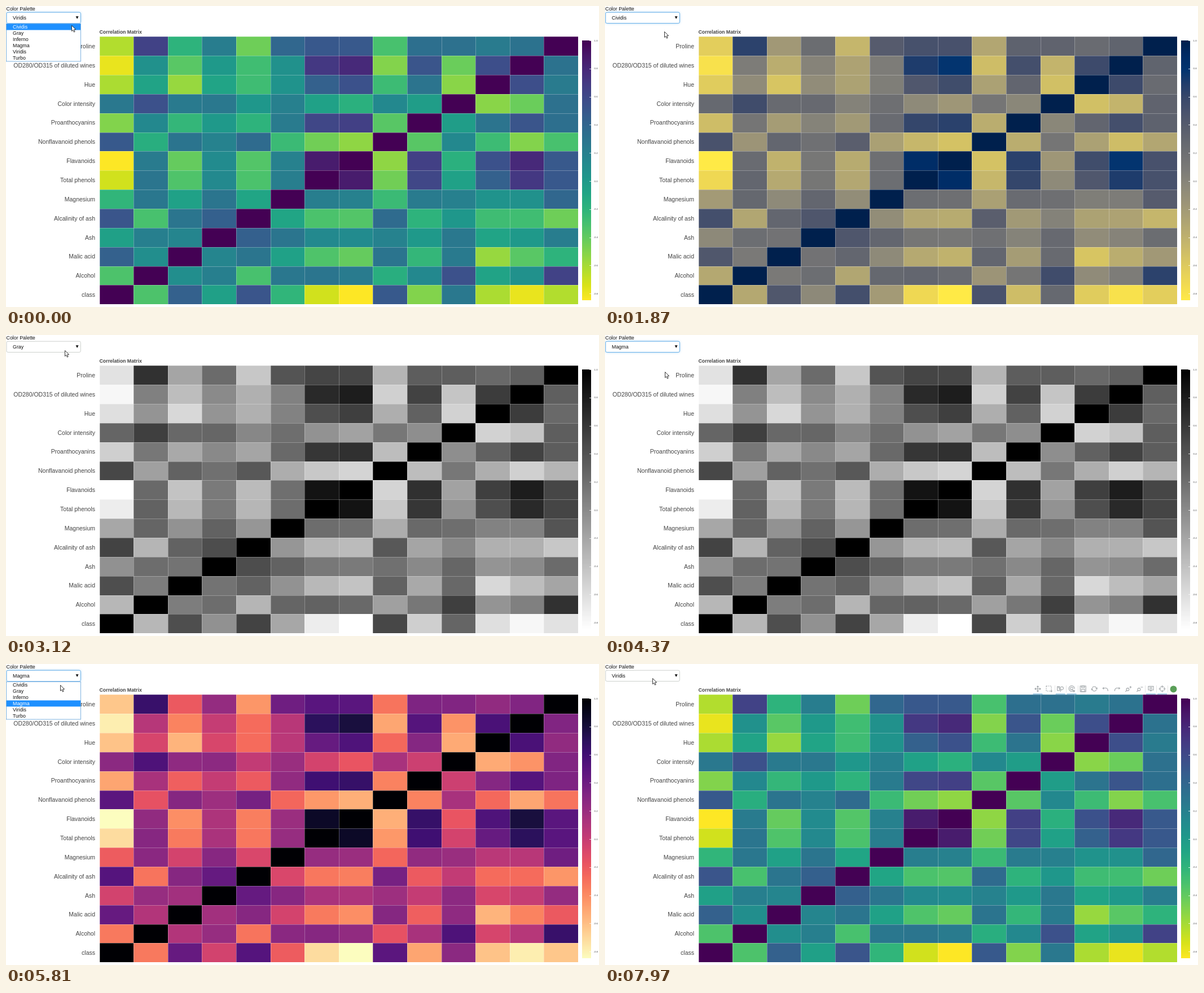
An HTML page with a canvas for the animation above (8 s loop, 1051x533 px).

```html
<!DOCTYPE html>
<html lang="en">
<head>
<meta charset="utf-8">
<title>Correlation Matrix</title>
<style>
html, body { margin: 0; width: 100%; height: 100%; overflow: hidden; background: #fff; }
canvas { display: block; }
</style>
</head>
<body>
<canvas id="stage" width="1051" height="533"></canvas>
<script>
const ctx = document.getElementById('stage').getContext('2d');
const FONT = '"Liberation Sans", Arial, sans-serif';
const LOOP = 8000;

const labels = ['class', 'Alcohol', 'Malic acid', 'Ash', 'Alcalinity of ash', 'Magnesium',
  'Total phenols', 'Flavanoids', 'Nonflavanoid phenols', 'Proanthocyanins',
  'Color intensity', 'Hue', 'OD280/OD315 of diluted wines', 'Proline'];

// Upper triangle of the correlations, in thousandths
const upper = [
  [-328, 438, -50, 518, -209, -719, -847, 489, -499, 266, -617, -788, -634],
  [94, 212, -310, 271, 289, 237, -156, 137, 546, -72, 72, 644],
  [164, 289, -55, -335, -411, 293, -221, 249, -561, -369, -192],
  [443, 287, 129, 115, 186, 10, 259, -75, 4, 224],
  [-83, -321, -351, 362, -197, 19, -274, -277, -441],
  [214, 196, -256, 236, 200, 55, 66, 393],
  [865, -450, 612, -55, 434, 700, 498],
  [-538, 653, -172, 543, 787, 494],
  [-366, 139, -263, -503, -311],
  [-25, 296, 519, 330],
  [-522, -429, 316],
  [565, 236],
  [313]
];
const LOW = -0.847, SPAN = 1 - LOW;

function corr(a, b) {
  if (a === b) return 1;
  const lo = Math.min(a, b), hi = Math.max(a, b);
  return upper[lo][hi - lo - 1] / 1000;
}

// Evenly spaced stops, from the highest value to the lowest
const palettes = {
  Viridis: '440154 481769 472A7A 433D84 3D4E8A 355E8D 2E6D8E 297B8E 23898E 1F978B 21A585 2EB37C 46C06F 65CB5E 89D548 B0DD2F D8E219 FDE725',
  Cividis: '00204D 002A64 00336F 213D6C 39486B 49526C 575C6D 64676F 707173 7C7B78 8A8779 989178 A69D75 B5A971 C4B56C D4C264 E4CF5B F2DB50 FFEA46',
  Gray: '000000 FFFFFF',
  Magma: '000004 07061C 150E38 29115A 3F0F72 56147D 6A1C81 802582 942C80 AB337C C03A76 D6456C E85362 F4685C FA815F FD9A6A FEB37B FECC8F FDE4A6 FCFDBF'
};
for (const name in palettes) {
  palettes[name] = palettes[name].split(' ').map(h => [0, 2, 4].map(i => parseInt(h.substr(i, 2), 16)));
}
const options = ['Cividis', 'Gray', 'Inferno', 'Magma', 'Viridis', 'Turbo'];

function color(name, value) {
  const stops = palettes[name];
  const p = Math.min(Math.max((1 - value) / SPAN, 0), 1) * (stops.length - 1);
  const i = Math.min(Math.floor(p), stops.length - 2);
  const rgb = stops[i].map((c, k) => Math.round(c + (stops[i + 1][k] - c) * (p - i)));
  return `rgb(${rgb})`;
}

// Each entry holds from its time until the next one
const paletteAt = [[0, 'Viridis'], [330, 'Cividis'], [2020, 'Gray'], [4560, 'Magma'], [7400, 'Viridis']];
const chosenAt = [[0, 'Viridis'], [160, 'Cividis'], [1770, 'Gray'], [4370, 'Magma'], [7150, 'Viridis']];
chosenAt[2][0] = 1950;
const openAt = [[0, true], [160, false], [780, true], [1770, false], [3250, true], [4370, false], [5700, true], [7150, false]];
const focusAt = [[0, true], [330, false], [780, true], [2020, false], [3250, true], [4560, false], [5700, true], [7400, false]];
const toolsAt = [[0, false], [2490, true], [2800, false], [5090, true], [5400, false], [7870, true]];
// The pointer only takes over the highlight once it moves inside the list
const hoverAt = [[0, true], [780, false], [1000, true], [3250, false], [3450, true], [5700, false], [5960, true]];

const path = [[0, 116, 34], [160, 116, 34], [820, 108, 15], [960, 108, 15], [1670, 105, 45],
  [2150, 105, 45], [2750, 104, 30], [3120, 104, 27], [3500, 104, 33], [4270, 106, 65], [4650, 106, 65],
  [5150, 98, 24], [5600, 96, 24], [5810, 96, 37], [6000, 97, 37], [6780, 99, 76], [7050, 98, 77],
  [7450, 98, 77], [7770, 92, 40], [7970, 84, 25]];

function held(track, t) {
  let v = track[0][1];
  for (const [at, value] of track) if (t >= at) v = value;
  return v;
}

function pointer(t) {
  for (let i = 1; i < path.length; i++) {
    const [t0, x0, y0] = path[i - 1], [t1, x1, y1] = path[i];
    if (t < t1) {
      const k = (t - t0) / (t1 - t0), e = k * k * (3 - 2 * k);
      return [x0 + (x1 - x0) * e, y0 + (y1 - y0) * e];
    }
  }
  return path[path.length - 1].slice(1);
}

function rect(x, y, w, h, fill) {
  ctx.fillStyle = fill;
  ctx.fillRect(x, y, w, h);
}

function text(s, x, y, size, fill, align = 'left', weight = '') {
  ctx.font = `${weight} ${size}px ${FONT}`;
  ctx.textAlign = align;
  ctx.fillStyle = fill;
  ctx.fillText(s, x, y);
}

function poly(points) {
  ctx.beginPath();
  points.forEach(([x, y]) => ctx.lineTo(x, y));
  ctx.closePath();
}

const X0 = 165.5, CW = 60.6, Y0 = 54.3, CH = 33.85;
const colX = i => Math.round(X0 + CW * i);
const rowY = i => Math.round(Y0 + CH * i);

function drawMatrix(name) {
  const n = labels.length;
  text('Correlation Matrix', 165.5, 49, 8.8, '#444', 'left', 'bold');
  for (let r = 0; r < n; r++) {
    const v = n - 1 - r;
    text(labels[v], 158, Y0 + CH * (r + 0.5) + 3.8, 10.5, '#444', 'right');
    for (let c = 0; c < n; c++) {
      rect(colX(c), rowY(r), colX(c + 1) - colX(c), rowY(r + 1) - rowY(r), color(name, corr(v, c)));
    }
  }
  const line = 'rgba(255,255,255,0.28)';
  for (let i = 0; i <= n; i++) {
    rect(colX(i), rowY(0), 1, rowY(n) - rowY(0), line);
    rect(colX(0), rowY(i), colX(n) - colX(0), 1, line);
  }
}

function drawColorBar(name) {
  const top = 61, height = 460, unit = height / SPAN;
  for (let y = 0; y < height; y++) rect(1021, top + y, 16, 1, color(name, 1 - (y + 0.5) / unit));
  for (let k = 5; k >= -4; k--) {
    const y = top + (1 - k / 5) * unit;
    rect(1034, Math.round(y), 3, 1, 'rgba(255,255,255,0.75)');
    text((k / 5).toFixed(1), k < 0 ? 1041.5 : 1042.5, y + 1.5, 4.4, '#444');
  }
}

function stroke(draw) {
  ctx.beginPath();
  draw();
  ctx.stroke();
}

function lines(...segs) {
  stroke(() => segs.forEach(([a, b, c, d]) => { ctx.moveTo(a, b); ctx.lineTo(c, d); }));
}

function ring(x, y, r, from = 0, to = Math.PI * 2) {
  stroke(() => ctx.arc(x, y, r, from, to));
}

function head(x, y, dx, dy) {
  poly([[x + dx * 3, y + dy * 3], [x - dy * 2.2, y + dx * 2.2], [x + dy * 2.2, y - dx * 2.2]]);
  ctx.fill();
}

function lens(sign) {
  ring(-1, 1, 2.4);
  lines([-3, 3, -5, 5], [2, -3, 6, -3]);
  if (sign > 0) lines([4, -5, 4, -1]);
}

function bend(dir) {
  ctx.save();
  ctx.scale(dir, 1);
  stroke(() => { ctx.moveTo(-3, -1); ctx.quadraticCurveTo(4, -3, 4, 4); });
  head(-3, -1, -1, 0);
  ctx.restore();
}

const icons = [
  () => {
    lines([-4, 0, 4, 0], [0, -4, 0, 4]);
    [[1, 0], [-1, 0], [0, 1], [0, -1]].forEach(([x, y]) => head(x * 3, y * 3, x, y));
  },
  () => {
    ctx.setLineDash([2, 1.4]);
    ctx.strokeRect(-5, -5, 9, 9);
    ctx.setLineDash([]);
    lines([2, 4, 6, 4], [4, 2, 4, 6]);
  },
  () => {
    ctx.strokeRect(-5.5, -4, 4, 7);
    lines([-3.5, -4, -3.5, -1]);
    ring(2.5, -1, 2.8);
    lines([1, 1, 0, 5]);
  },
  () => {
    ring(0, -0.5, 5, 0.9, 6.4);
    ring(0, -0.5, 2.5, 0.9, 6.4);
    lines([0, 0, 5, 5], [5, 2, 5, 5], [2, 5, 5, 5]);
  },
  () => {
    ctx.strokeRect(-5, -5, 10, 10);
    ctx.strokeRect(-2.5, -5, 5, 3);
    ctx.strokeRect(-3, 1, 6, 4);
  },
  () => {
    ring(0, 0, 4, 3.5, 5.8);
    ring(0, 0, 4, 0.4, 2.7);
    head(3.6, -1.5, 0.6, 0.8);
    head(-3.6, 1.5, -0.6, -0.8);
  },
  () => bend(1),
  () => bend(-1),
  () => lens(1),
  () => lens(-1),
  () => {
    ctx.strokeRect(-4.5, -4.5, 9, 6.5);
    lines([-2.5, -2.5, 2.5, -2.5], [-2.5, -0.5, 2.5, -0.5]);
    head(0, 2, 0, 1);
  },
  () => {
    ring(0, 0, 4.2);
    lines([-6, 0, -2, 0], [2, 0, 6, 0], [0, -6, 0, -2], [0, 2, 0, 6]);
  }
];

function drawTools() {
  const active = [0, 2, 3, 10, 11];
  icons.forEach((icon, i) => {
    const x = 767 + i * 20.05;
    ctx.save();
    ctx.translate(x, 44);
    ctx.strokeStyle = ctx.fillStyle = '#a1a6a9';
    ctx.lineWidth = 1.1;
    icon();
    ctx.restore();
    if (active.includes(i)) rect(x - 8.5, 52.5, 17, 1.2, '#6fb0d6');
  });
  [797, 817, 838, 957, 977, 997].forEach(x => rect(x, 38, 1, 12, '#e4e4e4'));
  ctx.beginPath();
  ctx.arc(1007.5, 44.5, 6, 0, Math.PI * 2);
  ctx.fillStyle = '#5a9f58';
  ctx.fill();
}

function drawSelect(value, focus) {
  text('Color Palette', 0.5, 7.5, 8.9, '#111');
  ctx.save();
  if (focus) {
    ctx.shadowColor = 'rgba(102,175,233,0.6)';
    ctx.shadowBlur = 4;
  }
  ctx.beginPath();
  ctx.roundRect(1, 11.2, 131.3, 19.4, 2.5);
  ctx.fillStyle = '#fff';
  ctx.fill();
  ctx.restore();
  ctx.strokeStyle = focus ? '#66afe9' : '#ccd0cc';
  ctx.lineWidth = 1;
  ctx.stroke();
  text(value, 12, 23.8, 8.9, '#111');
  poly([[123.6, 18.3], [128.6, 18.3], [126.1, 23]]);
  ctx.fillStyle = '#111';
  ctx.fill();
}

function drawList(marked) {
  const pitch = 10.95, top = 31.6;
  rect(0.5, 30.8, 132, 67.5, '#fff');
  ctx.strokeStyle = '#7fb3e0';
  ctx.lineWidth = 1;
  ctx.strokeRect(0.5, 31.5, 132, 66.5);
  options.forEach((name, i) => {
    const y = top + i * pitch;
    if (i === marked) rect(1, y, 131, pitch, '#1e90ff');
    text(name, 12, y + 8.5, 8.9, i === marked ? '#fff' : '#111');
  });
}

function drawPointer([x, y]) {
  ctx.save();
  ctx.translate(x, y);
  poly([[0.5, 0.5], [0.5, 10.6], [2.8, 8.5], [4.4, 12.2], [6.1, 11.4], [4.6, 7.8], [7.6, 7.6]]);
  ctx.fillStyle = '#fff';
  ctx.fill();
  ctx.strokeStyle = '#222';
  ctx.lineWidth = 0.9;
  ctx.stroke();
  ctx.restore();
}

function draw(t) {
  rect(0, 0, 1051, 533, '#fff');
  const name = held(paletteAt, t), value = held(chosenAt, t), at = pointer(t);
  drawMatrix(name);
  drawColorBar(name);
  if (held(toolsAt, t)) drawTools();
  drawSelect(value, held(focusAt, t));
  if (held(openAt, t)) {
    const row = Math.floor((at[1] - 31.6) / 10.95);
    const hovered = held(hoverAt, t) && row >= 0 && row < options.length;
    drawList(hovered ? row : options.indexOf(value));
  }
  drawPointer(at);
}

const start = performance.now();
function tick() {
  draw((performance.now() - start) % LOOP);
  requestAnimationFrame(tick);
}
tick();
</script>
</body>
</html>
```
